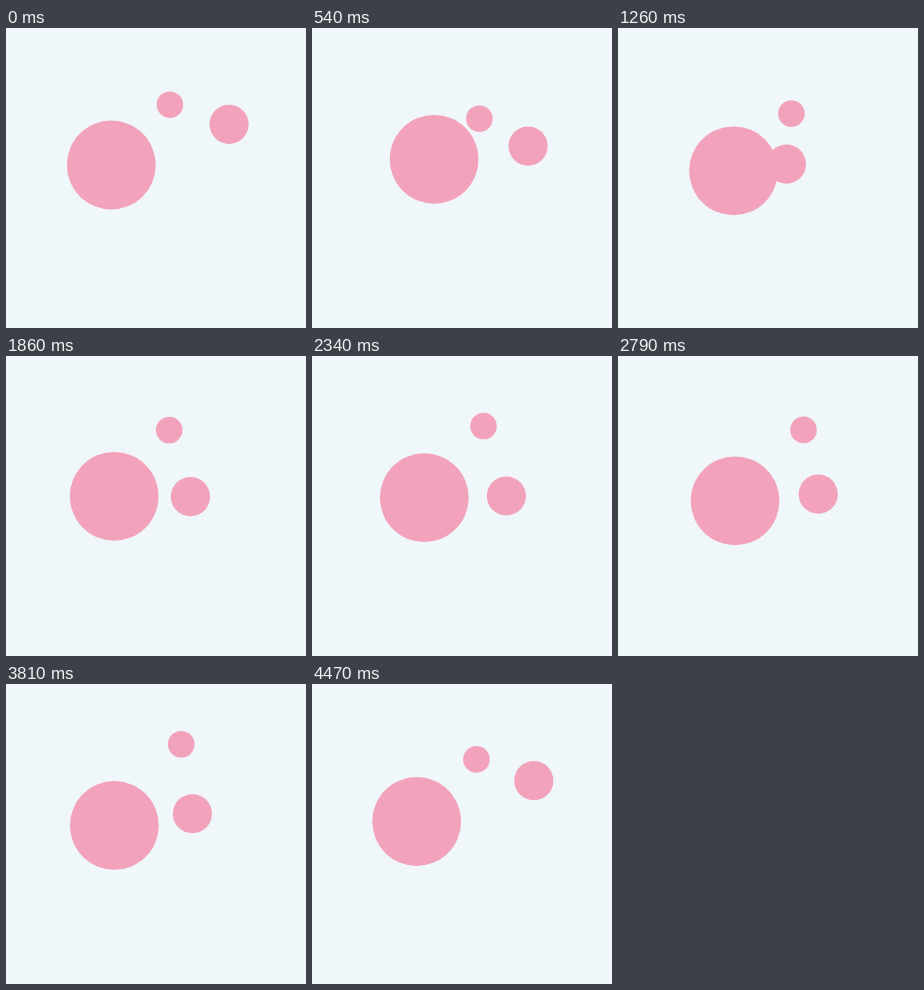
Animation of 300x300 px, one loop 4.53 s. Source, as an HTML page with a canvas:

```html
<!DOCTYPE html>
<html lang="en">
<head>
<meta charset="utf-8">
<title>Drifting circles</title>
<style>
  html, body { margin: 0; width: 100%; height: 100%; overflow: hidden; background: #eff7fb; }
  canvas { display: block; width: 100vw; height: 100vh; }
</style>
</head>
<body>
<canvas id="stage" width="300" height="300"></canvas>
<script>
const ctx = document.getElementById('stage').getContext('2d');
const STEP = 30, CYCLE = 4500, LOOP = 4530; // the last pose holds for one extra step

// Closed cubic spline through evenly timed values; phase runs from 0 to 1.
function loopCurve(values) {
  const n = values.length;
  const slopes = values.map(() => 0);
  for (let pass = 0; pass < 20; pass++) {
    for (let i = 0; i < n; i++) {
      const prev = (i + n - 1) % n, next = (i + 1) % n;
      slopes[i] = (3 * (values[next] - values[prev]) - slopes[prev] - slopes[next]) / 4;
    }
  }
  return phase => {
    const i = Math.floor(phase * n), next = (i + 1) % n;
    const u = phase * n - i, w = 1 - u;
    return values[i] * w * w * (1 + 2 * u) + values[next] * u * u * (1 + 2 * w)
      + u * w * (w * slopes[i] - u * slopes[next]);
  };
}

// A circle drifting through nine waypoints, 500 ms apart.
const drifter = (radius, xs, ys) => ({ radius, x: loopCurve(xs), y: loopCurve(ys) });

const circles = [
  drifter(44.4,
    [105.3, 121.4, 120.1, 111.5, 108.4, 114.5, 117.6, 114, 105],
    [137, 131.1, 139.6, 143.1, 139.7, 143.2, 144.6, 141, 141.7]),
  drifter(13.3,
    [163.9, 166.7, 173.6, 170.2, 162.8, 177.5, 186, 173.3, 176],
    [76.7, 90.4, 88.3, 82, 71.6, 71, 75.2, 69, 58.7]),
  drifter(19.6,
    [223.1, 218.6, 179.5, 169, 190, 195.5, 201, 186.8, 193],
    [96.3, 116.2, 131.4, 139.3, 140.6, 139.5, 137, 134, 122.5])
];

function draw(phase) {
  ctx.fillStyle = '#eff7fb';
  ctx.fillRect(0, 0, 300, 300);
  ctx.fillStyle = '#f2a2bb';
  for (const { radius, x, y } of circles) {
    ctx.beginPath();
    ctx.arc(x(phase), y(phase), radius, 0, Math.PI * 2);
    ctx.fill();
  }
}

const start = performance.now();
function tick() {
  const elapsed = (performance.now() - start) % LOOP;
  const time = Math.min(Math.floor(elapsed / STEP) * STEP, CYCLE - STEP);
  draw(time / CYCLE);
  requestAnimationFrame(tick);
}
tick();
</script>
</body>
</html>
```
